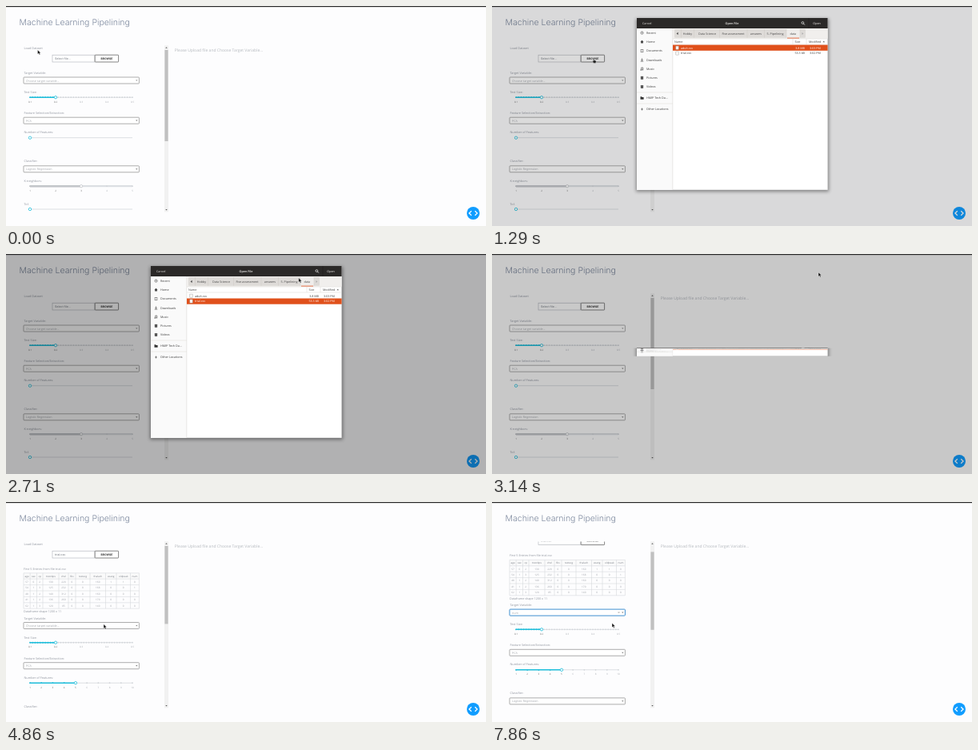
Recreate the animation shown at these times as an HTML page. Size 600 by 275 pixels, loop 8000 ms.

```html
<!DOCTYPE html>
<html lang="en">
<head>
<meta charset="utf-8">
<title>Machine Learning Pipelining</title>
<style>
html, body { margin: 0; width: 100%; height: 100%; overflow: hidden; background: #fdfdfe; }
svg { display: block; width: 100vw; height: 100vh; }
text { font-family: "Open Sans", sans-serif; font-size: 3.8px; fill: #8f949e; text-rendering: geometricPrecision; }
.inter { font-family: Inter, sans-serif; }
</style>
</head>
<body>
<svg id="stage" viewBox="0 0 600 275" xmlns="http://www.w3.org/2000/svg"></svg>
<script>
const CYAN = '#20bfdc', GREY = '#dcdfe3', DARK = '#3c3c3c';

// Markup helpers
const text = (x, y, s, attrs = '') => `<text x="${x}" y="${y}" ${attrs}>${s}</text>`;
const rect = (x, y, w, h, fill, attrs = '') =>
  `<rect x="${x}" y="${y}" width="${w}" height="${h}" fill="${fill}" ${attrs}/>`;
const path = (d, stroke, width = 0.6, attrs = '') =>
  `<path d="${d}" fill="none" stroke="${stroke}" stroke-width="${width}" ${attrs}/>`;
const tri = (x, y, r, dir, fill) =>
  `<path d="M${x - r} ${y - r * 0.5 * dir}h${2 * r}l${-r} ${r * 1.2 * dir}z" fill="${fill}"/>`;
const group = (id, body, attrs = '') => `<g id="${id}" ${attrs}>${body}</g>`;
const mid = (size, fill) => `text-anchor="middle" style="font-size:${size}px;fill:${fill}"`;
const label = (y, s) => text(22.5, y + 1.4, s);

function select(y, s, id = '') {
  return rect(22, y - 4, 144.4, 8, '#fff', `rx="0.8" stroke="#8a8a8a" stroke-width="0.7" ${id && `id="${id}Box"`}`) +
    text(25, y + 1.5, s, `style="font-size:3.7px;fill:#a4a7ad" ${id && `id="${id}Text"`}`) +
    tri(163.3, y, 1.2, 1, '#777');
}

function knob(x, y, color) {
  return `<circle cx="${x}" cy="${y}" r="1.7" fill="#fff" stroke="${color}" stroke-width="0.8"/>`;
}

function slider(y, to, { gap = 0, color = CYAN, thick = 1, marks = [] } = {}) {
  const dots = (x, end, c) => gap
    ? path(`M${x} ${y}H${end + 0.1}`, c, 1.8, `stroke-linecap="round" stroke-dasharray="0 ${gap}"`) : '';
  const step = 128 / (marks.length - 1);
  return path(`M30 ${y}H158`, GREY, thick) + dots(30, 158, '#d3d6da') +
    path(`M30 ${y}H${to}`, color, thick + 0.4) + dots(30, to, color) + knob(to, y, color) +
    marks.map((m, i) => {
      const x = 30 + i * step;
      return text(x, y + 6.4, m, mid(3, x <= to + 0.5 ? '#666' : '#a9adb3'));
    }).join('');
}

const count = n => Array.from({ length: n }, (_, i) => i + 1);

function table() {
  const edges = [22, 30.2, 38.5, 46, 66, 78, 87, 105, 124.5, 138, 155.5, 166.4];
  const rows = [
    'age sex cp trestbps chol fbs restecg thalach exang oldpeak num',
    '57 0 2 130 220 0 0 160 1 1 0',
    '54 1 3 125 232 0 0 168 0 0 1',
    '48 1 2 140 312 0 0 160 0 0 0',
    '41 1 2 136 260 0 0 170 0 0 0',
    '62 1 3 120 85 0 0 140 0 0 0'
  ];
  const top = 88.8, h = 7.4;
  let out = rect(22, top, 144.4, h, '#fafafa');
  for (let i = 0; i <= rows.length; i++) out += path(`M22 ${top + i * h}H166.4`, '#cfd2d6', 0.5);
  for (const x of edges) out += path(`M${x} ${top}v${h * rows.length}`, '#cfd2d6', 0.5);
  rows.forEach((row, i) => row.split(' ').forEach((v, j) => {
    out += text((edges[j] + edges[j + 1]) / 2, top + i * h + 4.8, v, mid(3.1, i ? '#9a9ea5' : '#777c85'));
  }));
  return out;
}

const FIELDS = ['age', 'sex', 'cp', 'trestbps', 'chol', 'fbs', 'restecg', 'thalach', 'exang', 'oldpeak', 'num'];

function dropdown() {
  return rect(22, 97, 144.4, 50.2, '#fff', 'stroke="#999" stroke-width="0.6"') +
    `<g clip-path="url(#listClip)">` +
    group('options', FIELDS.map((f, i) => text(23.5, 102.4 + i * 8.7, f, 'style="font-size:3.6px"')).join('')) +
    '</g>' + rect(162.3, 97.4, 3.8, 49.4, '#f1f1f1') +
    rect(162.6, 101, 3.2, 21.5, '#bdbdbd', 'id="listThumb"') +
    tri(164.2, 99.2, 1, -1, '#555') + tri(164.2, 145, 1, 1, '#555');
}

function panel() {
  const upper = label(52.6, 'Load Dataset') +
    rect(58, 61.2, 53, 8.8, '#fff', 'stroke="#aeb2b8" stroke-width="0.6"') +
    text(61, 66.9, 'Select file...', 'id="file" class="inter" style="font-size:3.6px;fill:#70757d"') +
    rect(111.2, 61.2, 29.4, 8.8, '#fff', 'rx="0.6" stroke="#666" stroke-width="0.8"') +
    text(126, 66.8, 'BROWSE', `class="inter" font-weight="700" ${mid(3.4, '#333')}`);
  const preview = text(22, 84.9, 'First 5 Entries from file trial.csv', 'style="font-size:3.7px"') + table() +
    text(22, 138.2, 'Dataframe shape 1200 x 11', 'style="font-size:3.7px"');
  const lower = label(83.6, 'Target Variable:') + select(93, 'Choose target variable...', 'target') +
    group('clear', path('M157.6 92.1l1.8 1.8m0-1.8l-1.8 1.8', '#888', 0.5)) +
    label(107.6, 'Test Size:') +
    slider(114.2, 62, { gap: 3.2, marks: ['0.1', '0.2', '0.3', '0.4', '0.5'] }) +
    label(133.6, 'Feature Selection/Extraction:') + select(143.2, 'PCA') +
    label(157.8, 'Number of Features:') +
    group('count0', slider(164.7, 30)) +
    group('count1', slider(164.7, 87, { gap: 128 / 9, marks: count(10) })) +
    label(194, 'Classifier:') + select(203.8, 'Logistic Regression') +
    label(218.2, 'K-neighbors:') +
    slider(225.2, 94, { gap: 32, color: '#c3c6ca', thick: 2.2, marks: count(5) }) +
    label(247.2, 'Tol:') + slider(254, 30) + group('list', dropdown());
  return `<g clip-path="url(#panelClip)">` +
    group('scroll', upper + group('preview', preview) + group('lower', lower)) + '</g>';
}

function scrollbar() {
  return rect(198, 49.4, 5, 208, '#f1f1f1') + rect(198.4, 55, 4.2, 114, '#c1c1c1', 'id="thumb"') +
    tri(200.5, 52.2, 1.2, -1, '#555') + tri(200.5, 254.7, 1.2, 1, '#555');
}

function sideIcon(i, y) {
  const x = 187.5;
  if (i === 0) return `<circle cx="${x}" cy="${y}" r="1.6" fill="none" stroke="#444" stroke-width="0.6"/>` +
    path(`M${x} ${y - 1}v1h0.8`, '#444', 0.4);
  if (i === 1) return `<path d="M${x - 2} ${y}l2-2l2 2h-0.6v1.8h-2.8v-1.8z" fill="#444"/>`;
  if (i === 3) return path(`M${x} ${y - 2}v3m-1.3-1.2l1.3 1.3l1.3-1.3M${x - 1.8} ${y + 1.9}h3.6`, '#444');
  if (i === 4) return path(`M${x - 0.8} ${y + 1.4}v-3h2v2.6`, '#444') +
    `<circle cx="${x - 1.3}" cy="${y + 1.4}" r="0.7" fill="#444"/><circle cx="${x + 0.7}" cy="${y + 1.1}" r="0.7" fill="#444"/>`;
  if (i === 7) return `<path d="M${x - 2} ${y - 1.7}h1.6l0.6 0.7h1.9v2.8h-4.1z" fill="#333"/>`;
  if (i === 8) return path(`M${x - 1.5} ${y}h3m-1.5-1.5v3`, '#444');
  return rect(x - 1.4, y - 1.7, 2.8, 3.4, i === 2 ? 'none' : '#555', 'stroke="#444" stroke-width="0.5"');
}

function dialog() {
  const small = fill => `style="font-size:3.7px;fill:${fill}"`;
  const places = ['Recent', 'Home', 'Documents', 'Downloads', 'Music', 'Pictures', 'Videos', 'HMIP Tech Da...', 'Other Locations'];
  const placeY = [33.6, 44.8, 56.1, 67.3, 78.6, 89.8, 101, 115, 129];
  const crumbs = [['Hobby', 244.5], ['Data Science', 269], ['Five-assessment', 301.5], ['answers', 330], ['5. Pipelining', 354], ['data', 376.3]];
  let out = rect(180, 16, 241, 216, '#000', 'opacity="0.4" filter="url(#blur)"') +
    rect(181, 15, 238.6, 214.8, '#fff') + rect(181, 15, 238.6, 13, '#2b2928') +
    text(188, 23, 'Cancel', small('#e8e6e3')) +
    text(300, 23, 'Open File', `font-weight="600" ${mid(3.7, '#f4f2ef')}`) +
    `<circle cx="388.4" cy="21" r="1.4" fill="none" stroke="#eee" stroke-width="0.7"/>` +
    path('M389.4 22l1.5 1.6', '#eee', 0.8) + path('M396 15v13', '#1d1b1a', 0.5) +
    text(406, 23, 'Open', mid(3.7, '#f4f2ef')) +
    rect(181, 28, 45, 201.8, '#fafafa') + path('M225.8 28V229.8', '#d5d2cf', 0.5) +
    path('M181 108h45M181 122h45', '#dddad7', 0.5);
  places.forEach((p, i) => { out += sideIcon(i, placeY[i]) + text(193, placeY[i] + 1.3, p, small('#3a3a3a')); });
  out += rect(226, 28, 193.6, 12.8, '#f1efed') + rect(228, 29, 164, 10.8, '#dedbd8', 'rx="1"') +
    rect(368, 29, 17, 10.8, '#efedeb') + rect(369, 39.7, 15, 0.9, '#e95420') +
    path('M236.5 29v10.8M252.5 29v10.8M284.5 29v10.8M319 29v10.8M340.5 29v10.8M368 29v10.8M385 29v10.8', '#c9c5c1', 0.4) +
    '<path d="M232.6 32.7v3.4l-2-1.7z" fill="#444"/><path d="M387.5 32.9v3l1.8-1.5z" fill="#aaa"/>';
  crumbs.forEach(([s, x]) => { out += text(x, 35.7, s, mid(3.7, '#444')); });
  out += path('M226 41H419.6M226 48H419.6M376 41v7M393 41v7', '#d9d6d3', 0.5) +
    text(228, 46, 'Name', small('#444')) + text(378.5, 46, 'Size', small('#444')) +
    text(396, 46, 'Modified', small('#444')) + tri(414.8, 44.6, 1.1, -1, '#444') +
    rect(226, 48.6, 193.6, 7.2, '#e0501b', 'id="pick"');
  [['adult.csv', '3.8 MB', '3:03 PM', 52.2], ['trial.csv', '53.3 kB', '3:02 PM', 59]].forEach(([n, s, m, y], i) => {
    out += rect(229.8, y - 2.1, 3.4, 4.2, '#f7f5f3', 'stroke="#999" stroke-width="0.4"') +
      group('row' + i, text(236, y + 1.3, n) + text(391, y + 1.3, s, 'text-anchor="end"') + text(397, y + 1.3, m));
  });
  return out;
}

const ARROW = '<path d="M0 0v5.2l1.3-1.1l0.9 2l1-0.4l-0.9-2h1.7z" fill="#111" stroke="#fff" stroke-width="0.35"/>';
const HAND = '<path d="M0.6 0.4q0.7-0.7 1.1 0.2v1.8l2.1 0.5q0.6 0.3 0.4 1.2l-0.6 2h-2.6l-1.6-2.4q0.1-0.8 1.2-0.1z" fill="#222" stroke="#fff" stroke-width="0.35"/>';

const stage = document.getElementById('stage');
stage.innerHTML = `<defs>
  <clipPath id="panelClip"><rect x="15" y="49.4" width="182" height="208"/></clipPath>
  <clipPath id="listClip"><rect x="22" y="97.3" width="140" height="49.6"/></clipPath>
  <filter id="blur" x="-10%" y="-10%" width="120%" height="120%"><feGaussianBlur stdDeviation="2"/></filter>
  </defs>` +
  rect(0, 0, 600, 275, '#fdfdfe') +
  text(16.6, 24, 'Machine Learning Pipelining', 'class="inter" font-weight="300" style="font-size:10.5px;fill:#7d899e"') +
  text(210.8, 57, 'Please Upload file and Choose Target Variable...', 'style="font-size:5px;fill:#b4b8be"') +
  panel() + scrollbar() +
  '<circle cx="584" cy="259" r="8" fill="#119dff"/>' +
  path('M581.8 256.2l-2.9 2.8l2.9 2.8M586.2 256.2l2.9 2.8l-2.9 2.8', '#fff', 1.2) +
  rect(0, 0, 600, 275, '#000', 'id="dim"') +
  rect(0, 0, 600, 1.2, '#2a2a2a') +
  group('dialog', dialog()) + group('arrow', ARROW) + group('hand', HAND);

const el = {};
stage.querySelectorAll('[id]').forEach(n => { el[n.id] = n; });

// Keys are [ms, value...]; values run linearly between them
function at(keys, t) {
  let i = keys.findIndex(k => k[0] > t);
  if (i < 0) return keys[keys.length - 1].slice(1);
  if (i === 0) return keys[0].slice(1);
  const a = keys[i - 1], b = keys[i], u = (t - a[0]) / (b[0] - a[0]);
  return a.slice(1).map((v, j) => v + (b[j + 1] - v) * u);
}

const POINTER = [
  [0, 39.5, 55], [430, 90, 59], [710, 126, 65.3], [1290, 126, 65.3], [1570, 259.5, 61.5], [2000, 252, 57.5],
  [2290, 256, 57], [2860, 405, 20.5], [3140, 408, 23], [3430, 385, 35], [4290, 130, 157], [4710, 122, 152.8],
  [5000, 122, 152.8], [5430, 62, 180], [5710, 45, 192], [6280, 32, 190], [6430, 28.5, 185.5], [6570, 28.5, 185.5],
  [7140, 37, 203.5], [7290, 37, 203.5], [7430, 40, 195], [7860, 150, 151.5]
];
const DIM = [[860, 0], [1000, 0.04], [1290, 0.14], [1570, 0.3], [2860, 0.3], [3140, 0.21], [3430, 0]];
const UNFOLD = [[860, 0], [1000, 0.1], [1140, 0.7], [1290, 1], [2860, 1], [3000, 0.5], [3140, 0.047], [3290, 0]];
const LIST = [[5430, 0], [5860, 1]];
const PAGE = [[5860, 0], [6280, 16.4]];

const show = (node, on) => node.setAttribute('display', on ? 'inline' : 'none');
const move = (node, x, y) => node.setAttribute('transform', `translate(${x} ${y})`);

function draw(t) {
  const loaded = t >= 3570, open = t >= 5000 && t < 7430, chosen = t >= 7430, trial = t >= 2140;
  const [x, y] = at(POINTER, t), [dim] = at(DIM, t), [fold] = at(UNFOLD, t);
  const [list] = at(LIST, t), [page] = at(PAGE, t);

  move(el.scroll, 0, -page);
  move(el.lower, 0, loaded ? 61.5 : 0);
  show(el.preview, loaded);
  show(el.count0, !loaded);
  show(el.count1, loaded);
  el.file.textContent = loaded ? 'trial.csv' : 'Select file...';
  el.thumb.setAttribute('y', 55 + page * 0.45);
  el.thumb.setAttribute('height', loaded ? 97.4 : 114);

  show(el.list, open);
  move(el.options, 0, -45 * list);
  move(el.listThumb, 0, 20.5 * list);
  show(el.clear, chosen);
  el.targetText.textContent = chosen ? 'num' : 'Choose target variable...';
  el.targetBox.setAttribute('stroke', chosen ? '#3f8fd0' : open ? '#666' : '#8a8a8a');
  el.targetBox.setAttribute('stroke-width', chosen ? 1 : 0.7);

  el.dim.setAttribute('opacity', dim);
  show(el.dialog, fold > 0);
  el.dialog.setAttribute('transform', `translate(0 ${122.6 * (1 - fold)}) scale(1 ${fold})`);
  move(el.pick, 0, trial ? 6.9 : 0);
  [el.row0, el.row1].forEach((row, i) => {
    for (const n of row.children) n.style.cssText = `font-size:3.7px;fill:${trial === (i === 1) ? '#fff' : DARK}`;
  });

  const hand = (t >= 570 && t < 1430) || (t >= 6430 && t < 7430);
  show(el.arrow, !hand);
  show(el.hand, hand);
  move(hand ? el.hand : el.arrow, x, y);
}

const LOOP = 8000, FPS = 7, start = performance.now();
function tick(now) {
  const t = Math.max(0, now - start) % LOOP;
  const k = Math.min(Math.floor((t + 5) * FPS / 1000), LOOP * FPS / 1000 - 1);
  draw(Math.round(k * 100 / FPS) * 10);
  requestAnimationFrame(tick);
}
draw(0);
requestAnimationFrame(tick);
</script>
</body>
</html>
```
